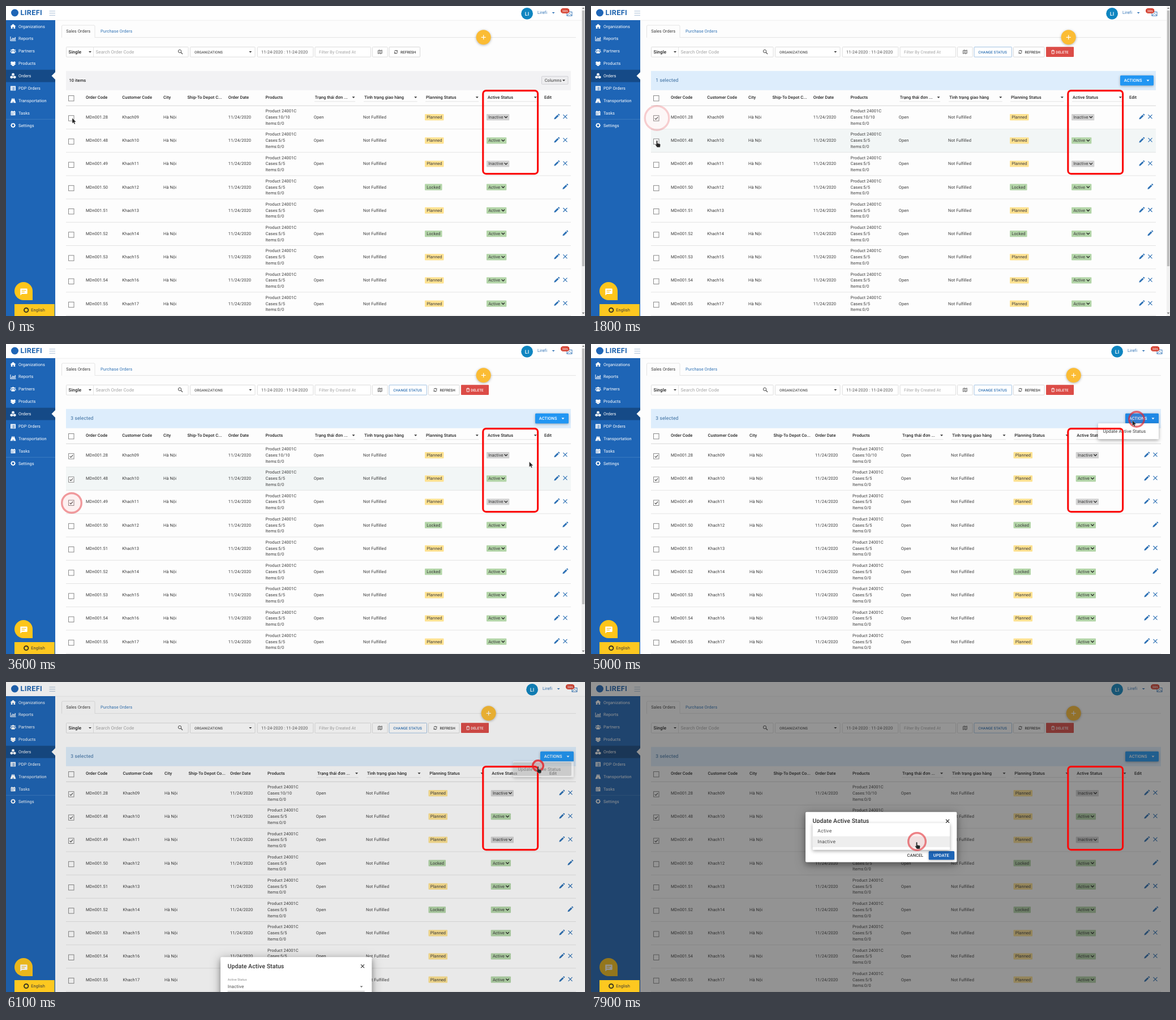
These frames come from a looping animation (1023 px wide and 548 px high, 8 s). An HTML page:

```html
<!DOCTYPE html>
<html lang="en">
<head>
<meta charset="utf-8">
<title>Sales orders: update active status</title>
<style>
html, body { margin: 0; width: 100%; height: 100%; overflow: hidden; background: #fdfdfd; }
svg { display: block; width: 1023px; height: 548px; }
text { font: 7.46px Roboto, "Open Sans", sans-serif; letter-spacing: .07px; fill: #3a3a3a; white-space: pre; text-rendering: geometricPrecision; }
.th { font-weight: 500; fill: #222; }
.side { fill: #fff; }
.link { fill: #2f72b5; }
.ph { font-size: 8px; fill: #a3a3a3; }
.ph2 { fill: #a3a3a3; }
.med { font-size: 8px; font-weight: 500; fill: #222; }
.btn { font-size: 6.35px; font-weight: 500; letter-spacing: .05px; }
.act { font-weight: 500; }
.white { fill: #fff; }
.grey { fill: #555; }
.brand { font-size: 12.6px; font-weight: 700; letter-spacing: .4px; fill: #1c62ae; }
.initials { font-size: 9px; font-weight: 500; fill: #fff; text-anchor: middle; }
.badge { font-size: 6px; fill: #fff; text-anchor: middle; }
.sel { font-size: 8.53px; letter-spacing: .12px; fill: #35699c; }
.menu { font-size: 8px; }
.opt { font-size: 8.53px; letter-spacing: .3px; fill: #484848; }
.title { font-size: 10.5px; font-weight: 500; fill: #333; }
.label { font-size: 5.6px; fill: #888; }
.value { font-size: 8px; letter-spacing: .12px; fill: #555; }
.fab { filter: drop-shadow(0 1.5px 2px rgba(0,0,0,.3)); }
.pop { filter: drop-shadow(0 2px 3px rgba(0,0,0,.35)); }
.deep { filter: drop-shadow(0 4px 5px rgba(0,0,0,.25)) drop-shadow(0 3px 9px rgba(0,0,0,.3)); }
</style>
</head>
<body>
<svg viewBox="0 0 1023 548">
  <g id="page"></g>
  <g id="menu"></g>
  <rect id="dim" width="1023" height="548" fill="#212121"/>
  <g id="lang"></g>
  <g id="dialog"></g>
  <g id="options"></g>
  <rect x="842.8" y="149.6" width="96.8" height="147" rx="5.5" fill="none" stroke="#fb0a0a" stroke-width="3.2"/>
  <g id="rings"></g>
  <path id="cursor" fill="#252525" stroke="#fff" stroke-opacity=".6" stroke-width=".5"/>
</svg>
<script>
const $ = id => document.getElementById(id);
const BLUE = '#1e65b6', ICON = '#2f72b5';

// Drawing helpers, each returning SVG markup
const txt = (x, y, s, cls = '') => `<text x="${x}" y="${y}" class="${cls}">${s}</text>`;
const box = (x, y, w, h, fill, extra = '') => `<rect x="${x}" y="${y}" width="${w}" height="${h}" fill="${fill}" ${extra}/>`;
const frame = (x, w, stroke = '#d6d6d6') => box(x, 72.5, w, 17.6, '#fff', `stroke="${stroke}" stroke-width=".8" rx="1"`);
const shape = (d, x = 0, y = 0, fill = '#fff') => `<path d="${d}" transform="translate(${x} ${y})" fill="${fill}" fill-rule="evenodd"/>`;
const line = (d, x = 0, y = 0, stroke = '#ddd', w = .8) => `<path d="${d}" transform="translate(${x} ${y})" fill="none" stroke="${stroke}" stroke-width="${w}"/>`;
const caret = (x, y, fill = '#333') => shape('M-2.5-1.2h5L0 1.4z', x, y, fill);
const cross = (x, y, r, stroke, w) => line(`M${-r} ${-r}L${r} ${r}M${r} ${-r}L${-r} ${r}`, x, y, stroke, w);
const pencil = (x, y) => shape('M-4.6 4.6-4 2 1.4-3.4 3.5-1.3-1.9 4zM2.1-4.1 3-5Q3.6-5.4 4.2-4.8L5-4Q5.5-3.4 5-2.8L4.2-2z', x, y, ICON);
const checkbox = (y, on) => box(110.6, y - 4.8, 9.4, 9.4, '#fff', 'stroke="#7c7c7c" stroke-width=".9"') +
  (on ? line('M-2.6 0-.8 2 2.8-2.2', 115.3, y, '#444', 1.1) : '');

const NAV = [
  ['Organizations', 'M0 5 5 .8 10 5H8.7V9H6V6H4V9H1.3V5z'],
  ['Reports', 'M0 1h1v7h9v1H0zM2 5h1.3v2.3H2zM4 3h1.3v4.3H4zM6 4h1.3v3.3H6zM8 2h1.3v5.3H8z'],
  ['Partners', 'M5 4.5a1.7 1.7 0 1 1 .01 0zM2 4.3a1.2 1.2 0 1 1 .01 0zM8 4.3a1.2 1.2 0 1 1 .01 0zM2 9V7q0-2 3-2t3 2v2zM0 7V6q0-1.2 2-1.2L1.6 7zM10 7V6q0-1.2-2-1.2L8.4 7z'],
  ['Products', 'M3 1 5 2.5 7 1 10 3 8 4.5 10 6 7 7.5 5 6 3 7.5 0 6 2 4.5 0 3zM2 8l3-1.5L8 8 5 9.5z'],
  ['Orders', 'M5 0 7.3 1.2v2.6L5 5 2.7 3.8V1.2zM2.4 4.8 4.8 6v2.6L2.4 9.8 0 8.6V6zM7.6 4.8 10 6v2.6L7.6 9.8 5.2 8.6V6z'],
  ['PDP Orders', 'M.5 1h9v8h-9zM2 3h1v1H2zM4 3h4v1H4zM2 5h1v1H2zM4 5h4v1H4zM2 7h1v1H2zM4 7h4v1H4z'],
  ['Transportation', 'M3 1h1.5v2h1V1H7l3 8H5.6V6.5H4.4V9H0z'],
  ['Tasks', 'M1 2h1.5V.8h1V2h3V.8h1V2H9v7.2H1zM2 4v1.2h1.4V4zM4.3 4v1.2h1.4V4zM6.6 4v1.2H8V4zM2 6.4v1.2h1.4V6.4zM4.3 6.4v1.2h1.4V6.4z'],
  ['Settings', 'M5 .5 6.2 1.8 8 1.5 8.2 3.4 9.6 4.7 8.5 6.2 8.4 8 6.6 8.2 5 9.4 3.6 8.2 1.7 8 1.6 6.2.4 4.8 1.8 3.4 2 1.5 3.8 1.8zM5 7a2 2 0 1 0-.01 0z']
];

function sidebar() {
  let s = box(0, 25, 87, 523, BLUE) + box(0, 112.7, 87, 21.8, '#154a87') + shape('M87 117 80.5 123.5 87 130z', 0, 0, '#fdfdfd') +
    line('M0 200.3H87', 0, 0, '#4a86c8', .7);
  NAV.forEach(([name, icon], i) => {
    const y = 36 + 21.88 * i;
    s += shape(icon, 7.5, y - 5) + txt(22, y + 2.6, name, 'side');
  });
  return s + shape('M15 504a16 16 0 1 1 32 0v16H31a16 16 0 0 1-16-16z', 0, 0, '#fdc51b') +
    shape('M25.5 499.5h11q1.2 0 1.2 1.2v7q0 1.2-1.2 1.2H28.3L25.3 511.6V500.7zM27.6 502v1.2h7.8V502zM27.6 505v1.2h5.4V505z');
}

function topBar(sh, wide) {
  return box(0, 0, 1023, 25, '#fff') + line('M87 25.3H1023', 0, 0, '#ececec', .8) +
    `<circle cx="15.5" cy="12" r="6.5" fill="${BLUE}"/>` + txt(25.5, 15.6, 'LIREFI', 'brand') +
    line('M76.5 9H87M76.5 12.7H87M76.5 16.4H87', 0, 0, '#a9bfd6', 1) +
    `<g transform="translate(${sh} 0)"><circle cx="920.6" cy="13.4" r="10.4" fill="#0f85c0"/>` +
    txt(920.6, 16.6, 'LI', 'initials') + txt(939, 14.4, 'Lirefi', 'link') + caret(967.2, 12.2, ICON) +
    box(991, 10.5, 9, 6.8, '#fff', `stroke="${ICON}" stroke-width=".9"`) + line('M991 16.8 995.5 13 1000 16.8', 0, 0, ICON, .9) +
    box(980, 4, 15.5, 9, '#d43f2f', 'rx="4.5"') + txt(987.7, 10.6, '386', 'badge') + '</g>' +
    (wide ? '' : box(1017, 0, 6, 548, '#f1f1f1') + box(1017.8, 8, 4.4, 452, '#bdbdbd') +
      caret(1020, 543, '#777') + shape('M-2 1h4L0-1.4z', 1020, 4, '#777'));
}

function toolbar(selected) {
  const refresh = x => frame(x, 54.5, '#cfcfcf') + line('M-2.6-.6A2.7 2.7 0 0 1 2-1.8M2.6.6A2.7 2.7 0 0 1-2 1.8', x + 12, 81.2, '#222', 1) +
    shape('M2.9-3v2.2H.7zM-2.9 3V.8h2.2z', x + 12, 81.2, '#222') + txt(x + 20, 83.5, 'REFRESH', 'btn');
  let s = line('M98 55.6H1007') + shape('M98.5 56V36q0-2 2-2h54.5q2 0 2 2v20z', 0, 0, '#fdfdfd') +
    line('M98.5 55.6V36q0-2 2-2h54.5q2 0 2 2v19.6') + txt(106.3, 47, 'Sales Orders') + txt(167, 47, 'Purchase Orders', 'link') +
    frame(106.5, 215.5) + line('M154.5 72.5v17.6') + txt(110.5, 83.8, 'Single', 'med') + caret(148.5, 81.2) +
    txt(158.5, 83.8, 'Search Order Code', 'ph') +
    '<circle cx="307" cy="80" r="2.7" fill="none" stroke="#555"/>' + line('M309 82 312 85', 0, 0, '#555', 1.2) +
    frame(325.5, 114.5) + txt(333, 83.5, 'ORGANIZATIONS', 'btn grey') + caret(431.8, 81.2) +
    frame(444.3, 98.5) + txt(451, 83.8, '11-24-2020 : 11-24-2020', 'grey') +
    frame(546, 98.5) + txt(553, 83.8, 'Filter By Created At', 'ph2') +
    frame(647.5, 26.5) + line('M-3.5-2.5-1.2-3.3 1.2-2.5 3.5-3.3V2.4L1.2 3.2-1.2 2.4-3.5 3.2zM-1.2-3.3V2.4M1.2-2.5V3.2', 660.8, 81.2, '#444', .8);
  if (!selected) return s + refresh(677);
  return s + frame(677, 66.5, '#8fb5dc') + txt(684.3, 83.5, 'CHANGE STATUS', 'btn link') + refresh(746.5) +
    box(804, 72.3, 49, 17.8, '#dc4c47', 'rx="1"') +
    line('M-2.8-2.2H2.8M-1-2.2V-3.2H1V-2.2M-2-2.2V3H2V-2.2', 816.2, 81.3, '#fff', .9) + txt(821.2, 83.5, 'DELETE', 'btn white');
}

function banner(selected, sh, hot) {
  const w = 892 + sh;
  if (!selected) return box(106, 114.8, w, 34, '#f2f2f4') + txt(111.5, 134, '10 items', 'th') +
    box(946.5, 124.3, 46.5, 14, '#ededef', 'stroke="#c9c9cf" stroke-width=".8" rx="1"') + txt(951.7, 134, 'Columns') + caret(985.5, 131.5);
  return box(106, 114.8, w, 34, '#ddedfc') + txt(114.3, 134.4, `${selected} selected`, 'sel') +
    `<g transform="translate(${sh} 0)">` + box(935, 122.8, 59, 17.8, hot ? '#1e88e5' : '#2196f3', 'rx="1.5" class="fab"') +
    txt(941.8, 134.2, 'ACTIONS', 'act white') + caret(984, 131.8, '#fff') + '</g>';
}

const CODES = [28, 48, 49, 50, 51, 52, 53, 54, 55];
const LOCKED = [3, 5], INACTIVE = [0, 2];

function table({ selected, hover, wide }, sh) {
  const X = (a, b) => wide ? b : a, right = 998 + sh;
  const heads = [['Order Code', 141], ['Customer Code', X(205.3, 206.5)], ['City', X(278, 280)],
    [wide ? 'Ship-To Depot Co...' : 'Ship-To Depot C...', X(320.5, 322.5)], ['Order Date', X(392.7, 396)], ['Products', X(458.5, 462)],
    ['Trạng thái đơn ...', X(545.7, 550)], ['Tình trạng giao hàng', X(633, 638)], ['Planning Status', X(742, 748.3)],
    ['Active Status', X(851, 858.3)], ['Edit', X(951, 960)]];
  let s = checkbox(163.3) + line(`M106 176.3H${right}`, 0, 0, '#cfcfcf');
  for (const [name, x] of heads) s += txt(x, 164, name, 'th');
  for (const [x, end] of [[X(545, 549), X(614, 619.5)], [X(632, 637), X(723.7, 730)], [X(741, 747), X(832.3, 841)], [X(850, 857), X(935.3, 943)]])
    s += line(`M${x} 168.8H${end + 3}`) + caret(end, 161.5);

  CODES.forEach((code, i) => {
    const top = 176.3 + 41.2 * i, y = top + 22.6;
    const locked = LOCKED.includes(i), inactive = INACTIVE.includes(i);
    const cases = i ? '5/5' : '10/10';
    const px = X(740, 746.5), ax = X(849, 856.7), cx = X(458.5, 462);
    const edit = X(988, 997);
    if (i === hover) s += box(106, top, 892 + sh, 41.2, '#f2f6f6');
    s += line(`M106 ${top + 41.2}H${right}`, 0, 0, '#dedede') + checkbox(top + 22.2, i < selected) +
      txt(141, y, `MDn001.${code}`) + txt(X(205.3, 206.5), y, `Khach${String(i + 9).padStart(2, '0')}`) +
      (i === 4 ? '' : txt(X(278, 280), y, 'Hà Nội')) + txt(X(392.7, 396), y, '11/24/2020') +
      txt(cx, y - 10.7, 'Product 24001C') + txt(cx, y, `Cases:${cases}`) + txt(cx, y + 10.7, 'Items:0/0') +
      txt(X(543.8, 547.8), y, 'Open') + txt(X(631, 636), y, 'Not Fulfilled') +
      box(px, top + 14.7, locked ? 30.5 : 33.5, 11.2, locked ? '#b3d5a8' : '#fee291', 'rx="1"') + txt(px + 3.2, y, locked ? 'Locked' : 'Planned') +
      box(ax, top + 14.7, inactive ? 40.3 : 35.3, 11.2, inactive ? '#d2d2d2' : '#b3d5a8', 'rx="1"') + txt(ax + 3.2, y, inactive ? 'Inactive' : 'Active') +
      line('M-2.7-1.3 0 1.4 2.7-1.3', ax + (inactive ? 34.3 : 29.3), top + 20, '#222', 1.3) +
      (locked ? pencil(edit, top + 19.4) : pencil(edit - 15, top + 19.4) + cross(edit, top + 19.4, 3.5, ICON, 1.2));
  });
  return s;
}

function drawPage(state) {
  const sh = state.wide ? 9 : 0;
  return box(0, 0, 1023, 548, '#fdfdfd') + toolbar(state.selected) + banner(state.selected, sh, state.hot) + table(state, sh) +
    `<circle cx="${843.7 + sh}" cy="55.3" r="13" fill="#fbbc34" class="fab"/>` + line('M-4 0H4M0-4V4', 843.7 + sh, 55.3, '#fff', 1.2) +
    topBar(sh, state.wide) + sidebar();
}

$('menu').innerHTML = box(896, 140.3, 107, 28, '#fff', 'rx="1" class="pop"') +
  box(896, 142, 103, 24, '#000', 'id="ripple" fill-opacity=".22" rx="2"') + txt(904.5, 156.6, 'Update Active Status', 'menu');
$('lang').innerHTML = box(15, 527, 70.7, 21, '#fdc820') +
  '<circle cx="35.7" cy="537.5" r="3.7" fill="none" stroke="#222" stroke-width="1.7"/>' + txt(44.3, 540.4, 'English');
$('dialog').innerHTML = box(379, 229.8, 267.3, 88.6, '#fff', 'rx="2" class="deep"') +
  txt(391.5, 249.4, 'Update Active Status', 'title') + cross(630, 246, 3, '#333', 1.1) +
  txt(391.7, 271.5, 'Active Status', 'label') + txt(391.7, 284.5, 'Inactive', 'value') + caret(628, 282.3, '#666') +
  box(391.5, 290, 242.3, .8, '#9a9a9a', 'id="underline"') + txt(558.5, 309, 'CANCEL', 'act') +
  box(596.7, 299, 45.3, 15.2, BLUE, 'rx="1.5" class="fab"') + txt(604.8, 309, 'UPDATE', 'act white');
$('options').innerHTML = box(391.5, 249.2, 242.5, 47.5, '#fff', 'rx="1" class="pop"') + box(391.5, 272.7, 242.5, 19.2, '#eeeeee') +
  txt(400.3, 266, 'Active', 'opt') + txt(400.3, 285.2, 'Inactive', 'opt');

// Timeline: step() holds the latest value, tween() interpolates between points
const step = (t, keys) => keys.reduce((v, k) => t >= k[0] ? k[1] : v, keys[0][1]);
function tween(t, keys, n = 1) {
  const i = keys.findIndex(k => k[0] > t);
  if (i <= 0) return keys.at(i)[n];
  const a = keys[i - 1], b = keys[i];
  return a[n] + (b[n] - a[n]) * (t - a[0]) / (b[0] - a[0]);
}

const PATH = [[0, 117, 198], [1400, 117, 198], [1600, 116.5, 237.5], [2200, 116.5, 238], [2400, 116, 281], [3100, 116, 283],
  [3200, 160, 303], [3300, 400, 311], [3400, 684, 288], [3500, 850, 238], [3600, 924.5, 208], [3800, 958, 150], [4000, 964, 133],
  [4800, 964, 133], [5000, 956.5, 135], [5400, 940, 149], [6100, 940, 149], [6300, 840, 178], [6600, 589.3, 230.5],
  [6900, 578, 272], [7000, 575.5, 283]];
const HAND = [[0, 0], [800, 1], [3200, 0], [5300, 1], [6200, 0], [7000, 1]];
const HOVER = [[0, -1], [100, 0], [1500, 1], [2300, 2], [3200, 3], [3500, 1], [3700, 0], [3800, -1]];
const CLICKS = [[900, 116.5, 198], [1900, 116.5, 239.5], [2900, 116, 281], [4500, 964, 133], [5800, 940, 148], [7300, 576, 282]];
const ARROW = 'M0 0V9.5L2.2 7.6 3.7 11 5.3 10.3 3.9 7H6.8z';
const POINTER = 'M0 0q1.1 0 1.1 1.2v4l4 .9q1.2.4 1 1.8L5.5 12H.2L-3 7.4q.3-1 1.9-.1V1.2Q-1.1 0 0 0z';

const ring = (t, [start, x, y]) => {
  const age = t - start;
  if (age < 0 || age > 1000) return '';
  const alpha = 1 - .92 * (age / 1000) ** 1.5;
  return `<circle cx="${x}" cy="${y}" r="${3.3 + age / 50}" fill="#f33" fill-opacity=".14" stroke="#e3262e" stroke-width="3.4" opacity="${alpha}"/>`;
};

let shown = '';
function render(t) {
  const state = {
    selected: step(t, [[0, 0], [1000, 1], [2000, 2], [3000, 3]]),
    hover: step(t, HOVER),
    wide: t >= 4600,
    hot: t >= 3900 && t < 5100
  };
  const key = JSON.stringify(state);
  if (key !== shown) $('page').innerHTML = drawPage(state);
  shown = key;

  $('menu').setAttribute('opacity', step(t, [[0, 0], [4600, .5], [4700, 1], [6100, .6], [6200, 0]]));
  $('ripple').setAttribute('opacity', step(t, [[0, 0], [5500, .3], [5900, 1]]));
  $('dim').setAttribute('opacity', .48 * Math.min(1, Math.max(0, (t - 6020) / 450)));
  $('dialog').setAttribute('visibility', t >= 6100 ? 'visible' : 'hidden');
  $('dialog').setAttribute('transform', `translate(0 ${tween(t, [[6000, 330], [6100, 256.4], [6200, 110], [6300, 30], [6400, 0]])})`);
  $('underline').setAttribute('fill', t >= 7100 ? BLUE : '#9a9a9a');
  $('options').setAttribute('opacity', step(t, [[0, 0], [7300, .5], [7400, 1]]));
  $('rings').innerHTML = CLICKS.map(c => ring(t, c)).join('');
  $('cursor').setAttribute('d', step(t, HAND) ? POINTER : ARROW);
  $('cursor').setAttribute('transform', `translate(${tween(t, PATH)} ${tween(t, PATH, 2)})`);
}

const begin = performance.now();
function tick() {
  const t = (performance.now() - begin) % 8000;
  render(Math.floor(t / 100) * 100);
  requestAnimationFrame(tick);
}
tick();
</script>
</body>
</html>
```
